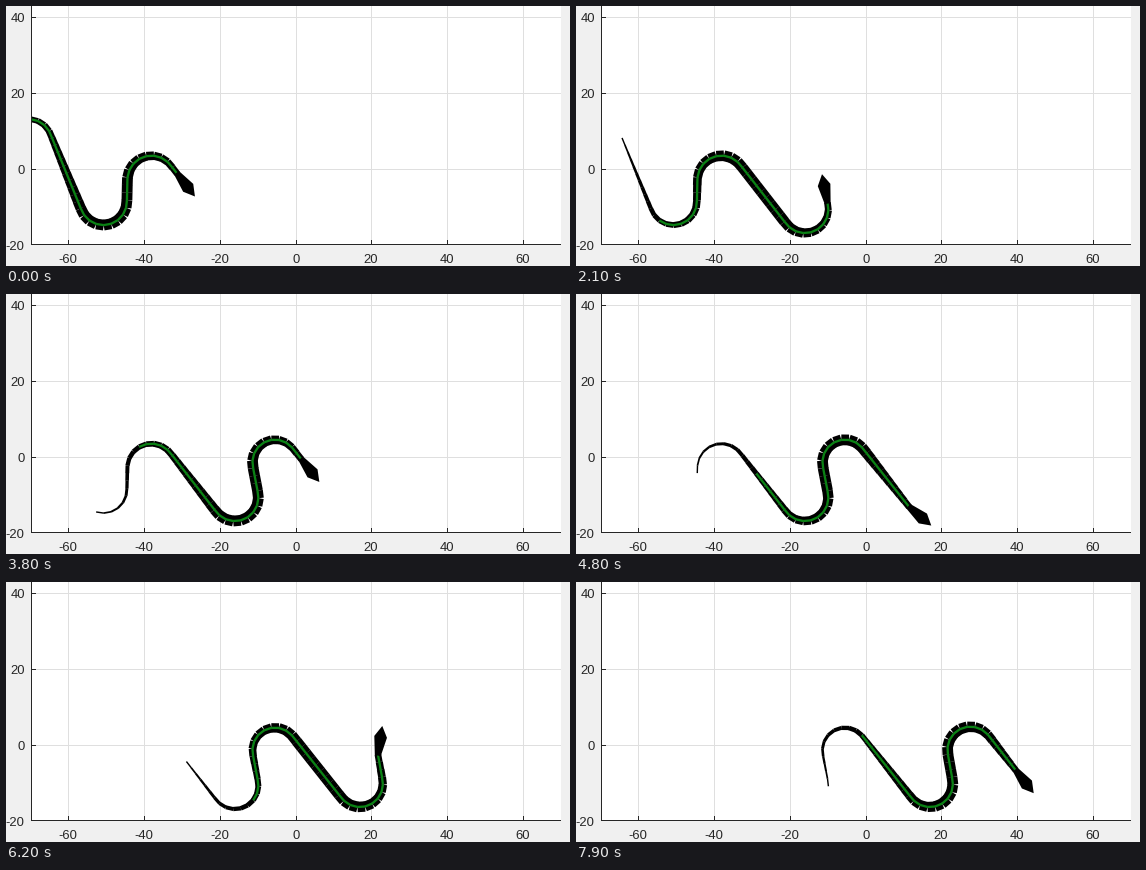
Animation of 564x260 px, one loop 8000 ms. Source, as a matplotlib script:

```python
import numpy as np
import matplotlib.pyplot as plt
from matplotlib.animation import FuncAnimation
from matplotlib.collections import LineCollection
from matplotlib.patches import Polygon, Rectangle

W, H, DPI = 564, 260, 64
PT = 72 / DPI                       # points per pixel
LEFT, RIGHT, BOTTOM = 25, 555, 239  # plot area in pixels
UNIT = 3.786                        # pixels per data unit
INK = "#262626"
GREEN = "#0a8214"

STEP = 7.6                          # segment length, also the advance per move
SEGMENTS = 48
FIRST_GREEN = 12                    # the tail before this segment has no stripe
FRAMES = 80
PAUSES = [4, 7, 9, 15, 22, 26, 32, 37, 41, 47, 54, 61, 65, 70, 76]

# The track weaves around these circles: x, y, radius, turning left and right in turn.
CIRCLES = [(-25.6, 159.6, 23.5), (22.9, 136.1, 23), (97.4, 195.6, 23.5),
           (145.4, 173.6, 24), (228.9, 203.6, 23.5), (268.9, 168.1, 22.5),
           (353.9, 202.1, 23), (394.4, 167.6, 23), (479.4, 201.6, 23)]


def build_track():
    headings = [np.radians(60)]
    for i, (a, b) in enumerate(zip(CIRCLES, CIRCLES[1:])):
        dx, dy = b[0] - a[0], b[1] - a[1]
        side = 1 if i % 2 else -1
        lean = np.arcsin((a[2] + b[2]) / np.hypot(dx, dy))
        headings.append(np.arctan2(dy, dx) + side * lean)
    headings.append(0)

    arcs = []
    for i, (cx, cy, r) in enumerate(CIRCLES):
        side = 1 if i % 2 else -1
        h = np.linspace(headings[i], headings[i + 1], 80)
        arcs.append(np.column_stack([cx + side * r * np.sin(h),
                                     cy - side * r * np.cos(h)]))
    points = np.vstack(arcs)
    length = np.r_[0, np.cumsum(np.hypot(*np.diff(points, axis=0).T))]
    even = np.arange(0, length[-1], 0.25)
    return even, np.interp(even, length, points[:, 0]), np.interp(even, length, points[:, 1])


TRACK_S, TRACK_X, TRACK_Y = build_track()
NECK_START = TRACK_S[np.argmin(np.hypot(TRACK_X - 170.9, TRACK_Y - 167.7))]


def on_track(s):
    return np.column_stack([np.interp(s, TRACK_S, TRACK_X),
                            np.interp(s, TRACK_S, TRACK_Y)])


def body_widths():
    from_tail = (np.arange(SEGMENTS) + 0.5) * STEP
    from_neck = SEGMENTS * STEP - from_tail
    tail = 1.3 + 9.7 * (from_tail / 210) ** 1.1
    neck = 6.5 + 4.3 * from_neck / 70
    return np.minimum(np.minimum(tail, neck), 10.8)


def head_shape(neck):
    base, ahead = on_track([neck, neck + 17])
    along = (ahead - base) / np.hypot(*(ahead - base))
    across = np.array([-along[1], along[0]])
    outline = [(-1, 3), (18, 6.4), (29, 0), (18, -6.4), (-1, -3)]
    return [base + a * along + b * across for a, b in outline]


fig = plt.figure(figsize=(W / DPI, H / DPI), dpi=DPI, facecolor="#f0f0f0")
ax = fig.add_axes([0, 0, 1, 1])
ax.set(xlim=(0, W), ylim=(H, 0))
ax.axis("off")


def rule(x, y, color, z):
    # Snapping would push lines on pixel centres to the next pixel.
    ax.plot(x, y, color=color, lw=PT, zorder=z, solid_capstyle="butt", snap=False)


def label(x, y, value, ha):
    ax.text(x, y, str(value), color=INK, family="Liberation Sans",
            size=13 * PT, ha=ha, va="center_baseline")


area = Rectangle((LEFT, 0), RIGHT - LEFT, BOTTOM, fc="white", ec="none", zorder=0)
ax.add_patch(area)

for value in range(-60, 61, 20):
    x = int(290 + value * UNIT) + 0.5
    rule([x, x], [0, BOTTOM], "#dfdfdf", 1)
    rule([x, x], [BOTTOM - 5, BOTTOM], INK, 6)
    label(x - 0.7, 252.5, value, "center")
for value in range(-20, 41, 20):
    y = int(163.4 - value * UNIT) + 0.5
    if value > -20:
        rule([LEFT, RIGHT], [y, y], "#dfdfdf", 1)
        rule([LEFT, LEFT + 5], [y, y], INK, 6)
    label(18.7, y + 0.3, value, "right")
rule([LEFT + 0.5] * 2, [0, BOTTOM], INK, 6)
rule([LEFT, RIGHT], [BOTTOM - 0.5] * 2, INK, 6)

skin = LineCollection([], colors="black", linewidths=body_widths() * PT,
                      capstyle="butt", zorder=3)
stripe = LineCollection([], colors=GREEN, linewidths=2.3 * PT,
                        capstyle="butt", zorder=4)
head = Polygon([(0, 0)] * 3, fc="black", ec="none", zorder=5)
for artist in (skin, stripe):
    ax.add_collection(artist, autolim=False)
ax.add_patch(head)
for artist in (skin, stripe, head):
    artist.set_clip_path(area)


def draw(frame):
    moves = frame - sum(p <= frame for p in PAUSES)
    neck = NECK_START + moves * STEP
    joints = on_track(neck - STEP * np.arange(SEGMENTS, -1, -1))
    # A slight overlap closes the seams on straight stretches.
    lap = np.diff(joints, axis=0) * 0.08 / STEP
    parts = np.stack([joints[:-1] - lap, joints[1:] + lap], axis=1)
    skin.set_segments(parts)
    stripe.set_segments(parts[FIRST_GREEN:])
    head.set_xy(head_shape(neck))
    return skin, stripe, head


anim = FuncAnimation(fig, draw, frames=FRAMES, interval=100, repeat=True)
plt.show()
```
